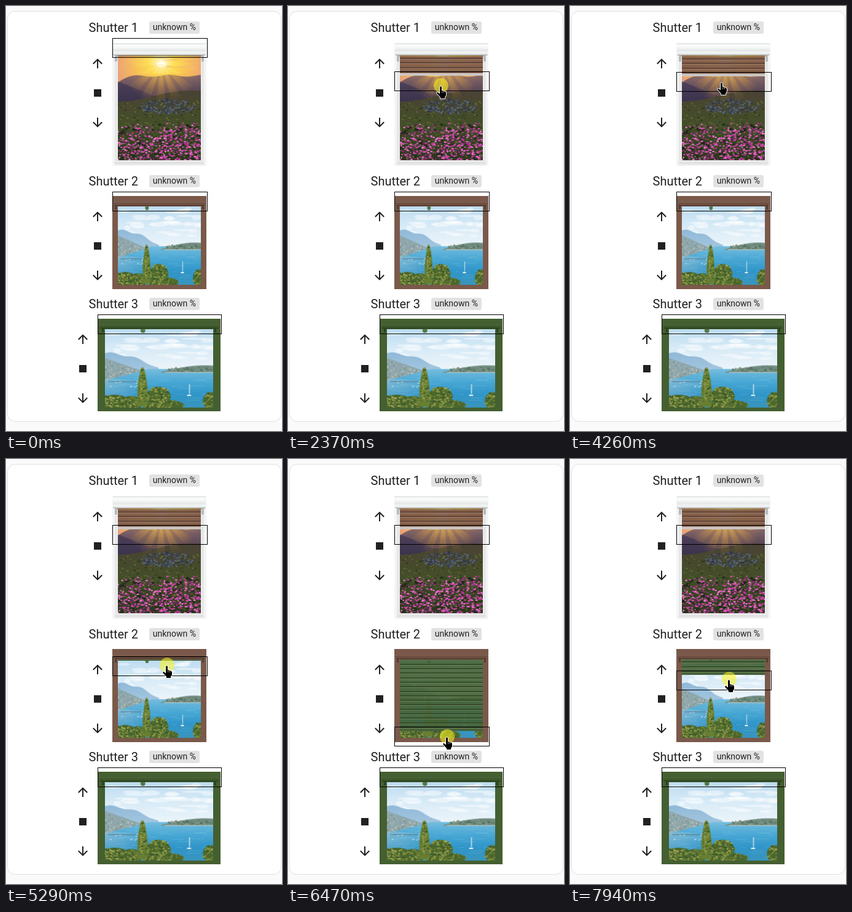
Recreate the animation shown at these times as an HTML page with a canvas. Size 449 px wide and 689 px high, loop 8000 ms.

```html
<!DOCTYPE html>
<html lang="en">
<head>
<meta charset="utf-8">
<title>Shutters</title>
<style>
html, body { margin: 0; width: 100%; height: 100%; overflow: hidden; background: #fafafa; }
canvas { display: block; }
</style>
</head>
<body>
<canvas id="stage" width="449" height="689"></canvas>
<script>
const W = 449, H = 689, LOOP = 8000;
const ctx = document.getElementById('stage').getContext('2d');

// Each move goes to a point in n even steps; bow bends the path sideways.
// While a handle (0 or 1) is dragged, its top edge goes to y = top.
const START = { x: 395, y: 678, tops: [52, 301] };
const MOVES = [
  { from: 530, till: 1540, n: 15, x: 260, y: 68, bow: -12, ease: 3 },
  { from: 1940, till: 2900, n: 15, x: 244, y: 187, bow: -3, ease: 1.15, handle: 0, top: 171, follow: 0.95 },
  { from: 3240, till: 3860, n: 10, x: 247, y: 123, bow: -2, ease: 2.1, handle: 0, top: 107, follow: 1.85 },
  { from: 4330, till: 5070, n: 11, x: 263, y: 315, bow: 20, ease: 1 },
  { from: 5220, till: 7020, n: 27, x: 259, y: 469, bow: -1, ease: 1.74, handle: 1, top: 452, follow: 1.73 },
  { from: 7280, till: 7940, n: 11, x: 259, y: 357, bow: 0, ease: 1.5, handle: 1, top: 343, follow: 1.5 }
];

const easeOut = (u, power) => 1 - Math.pow(1 - u, power);
const mix = (a, b, u) => a + (b - a) * u;

function pose(t) {
  let { x, y } = START;
  const tops = [...START.tops];
  for (const m of MOVES) {
    if (t < m.from) break;
    const step = (m.till - m.from) / (m.n - 1);
    const u = Math.min(1, (Math.floor((t - m.from) / step + 1e-6) + 1) / m.n);
    const v = easeOut(u, m.ease);
    x = mix(x, m.x, v) + m.bow * Math.sin(Math.PI * v);
    y = mix(y, m.y, v);
    if ('handle' in m) tops[m.handle] = mix(tops[m.handle], m.top, easeOut(u, m.follow));
  }
  return { x: Math.round(x), y: Math.round(y), tops: tops.map(Math.round) };
}

function random(seed) {
  return () => (seed = (seed * 16807) % 2147483647) / 2147483647;
}

function layer(w, h, paint) {
  const c = document.createElement('canvas');
  c.width = w;
  c.height = h;
  paint(c.getContext('2d'));
  return c;
}

function box(g, color, x, y, w, h) {
  g.fillStyle = color;
  g.fillRect(x, y, w, h);
}

function oval(g, color, x, y, rx, ry = rx) {
  g.fillStyle = color;
  g.beginPath();
  g.ellipse(x, y, rx, ry, 0, 0, Math.PI * 2);
  g.fill();
}

// Fills from the skyline f(x) down to base.
function hill(g, color, x0, x1, base, f) {
  g.fillStyle = color;
  g.beginPath();
  g.moveTo(x0, base);
  for (let x = x0; x <= x1; x++) g.lineTo(x, f(x));
  g.lineTo(x1, base);
  g.fill();
}

function stops(f, colors) {
  colors.forEach((c, i) => f.addColorStop(i / (colors.length - 1), c));
  return f;
}

const fade = (g, y0, y1, ...colors) => stops(g.createLinearGradient(0, y0, 0, y1), colors);
const glow = (g, x, y, r, ...colors) => stops(g.createRadialGradient(x, y, 0, x, y, r), colors);

function speckle(g, rnd, n, colors, size, place) {
  for (let i = 0; i < n; i++) {
    const [x, y] = place();
    const s = size * (0.5 + rnd());
    oval(g, colors[Math.floor(rnd() * colors.length)], x, y, s, s * 0.75);
  }
}

function inOval(rnd, x, y, rx, ry) {
  const a = rnd() * Math.PI * 2, d = Math.sqrt(rnd());
  return [x + rx * d * Math.cos(a), y + ry * d * Math.sin(a)];
}

const meadow = layer(137, 170, g => {
  const rnd = random(77);
  box(g, glow(g, 72, 12, 88, '#fffbd0', '#fddf55', '#f9c45c', '#efaa70', '#df9483'), 0, 0, 137, 60);
  for (let i = 0; i < 16; i++) {
    oval(g, 'rgba(240,165,115,.3)', rnd() * 137, rnd() * 28, 6 + rnd() * 10, 1.5);
  }
  oval(g, '#fffef0', 72, 15, 8, 5);
  hill(g, fade(g, 30, 80, '#8a6a6c', '#5d4b58', '#403a48'), 0, 137, 90,
    x => 33 + 10 * Math.exp(-x / 12) + 1.5 * Math.cos(x / 9));
  hill(g, 'rgba(48,42,80,.5)', 0, 80, 90, x => 42 + x * 0.4);
  box(g, glow(g, 72, 20, 60, 'rgba(255,215,90,.6)', 'rgba(235,165,70,.25)', 'rgba(220,150,60,0)'), 0, 30, 137, 60);
  hill(g, fade(g, 56, 170, '#4a4236', '#48482e', '#434f29', '#33431f', '#2b351d'), 0, 137, 170,
    x => 66 + 9 * Math.cos(x / 38));
  g.fillStyle = glow(g, 72, 14, 66, 'rgba(255,224,90,.4)', 'rgba(250,190,65,.25)', 'rgba(220,150,60,0)');
  for (let a = 0.3; a < 2.9; a += 0.43) {
    g.beginPath();
    g.moveTo(72, 14);
    g.arc(72, 14, 70, a - 0.13, a + 0.13);
    g.fill();
  }
  speckle(g, rnd, 420, ['#2d3a1e', '#566a2c', '#3e4a25', '#66693a'], 1.3,
    () => [rnd() * 137, 74 + rnd() * 96]);
  speckle(g, rnd, 330, ['#4d5878', '#343d59', '#626c8a', '#2c344b'], 1.1,
    () => inOval(rnd, 82, 83, 46, 12));
  speckle(g, rnd, 160, ['#25301b', '#31421f', '#1f2619'], 2.2,
    () => [rnd() * 137, 112 + rnd() * 58]);
  speckle(g, rnd, 620, ['#b73a97', '#d450b2', '#e678c8', '#8e2c75', '#cc48a8'], 1.4,
    () => [rnd() * 137, 110 + Math.pow(rnd(), 0.75) * 60]);
});

const bay = layer(178, 128, g => {
  g.scale(178 / 137, 1);
  const rnd = random(31);
  box(g, fade(g, 0, 66, '#bddcf1', '#d8ebf7', '#edf5fa'), 0, 0, 137, 66);
  for (let i = 0; i < 34; i++) {
    oval(g, 'rgba(255,255,255,.45)', 10 + rnd() * 127, 4 + rnd() * 48, 5 + rnd() * 12, 1.5 + rnd() * 3);
  }
  hill(g, fade(g, 36, 76, '#8fb8d8', '#a9cbe1'), 0, 68, 76,
    x => 39 + x * x * 0.0055 - 1.5 * Math.sin(x / 5));
  hill(g, '#8ea7ad', 0, 50, 86, x => 47 + x * 0.45);
  speckle(g, rnd, 150, ['#b5bdb5', '#d4d2c8', '#6d8a84', '#94a49f'], 0.9, () => {
    const x = rnd() * 42;
    return [x, 50 + x * 0.45 + rnd() * (32 - x * 0.6)];
  });
  hill(g, fade(g, 63, 128, '#7abfdf', '#4ba9d5', '#3095c9', '#3a95bd'), 0, 137, 128,
    x => Math.max(65, 84 - x * 0.34));
  box(g, glow(g, 0, 84, 55, 'rgba(160,195,212,.6)', 'rgba(160,195,212,0)'), 0, 82, 60, 46);
  for (let i = 0; i < 38; i++) {
    box(g, 'rgba(150,212,236,.3)', rnd() * 130, 68 + rnd() * 48, 5 + rnd() * 14, 0.8);
  }
  hill(g, '#738d82', 71, 137, 71, x => 70 - 11 * Math.sin((x - 71) / 35));
  speckle(g, rnd, 90, ['#5d7a66', '#8a9c90', '#4f6d5a'], 1.1,
    () => inOval(rnd, 108, 66, 30, 4));
  box(g, '#c4cec9', 76, 70, 61, 1);
  box(g, '#5b8095', 4, 85, 38, 1.2);
  for (let i = 0; i < 9; i++) box(g, '#e6eef0', 4 + rnd() * 40, 84 + rnd() * 10, 2.5, 0.9);

  const leaves = ['#6c8038', '#8a9645', '#526d2e', '#a0a555', '#3d5a2b'];
  const bushes = [[12, 121, 20, 14], [33, 121, 14, 12], [68, 110, 15, 16], [74, 124, 26, 9], [134, 117, 10, 14]];
  for (const b of bushes) {
    oval(g, '#4b682d', ...b);
    speckle(g, rnd, b[2] * b[3] * 0.5, leaves, 1.4, () => inOval(rnd, ...b));
  }
  hill(g, '#687f32', 41, 54, 126, x => 62 + Math.pow(Math.abs(x - 47.5) / 6.5, 2) * 34);
  speckle(g, rnd, 110, leaves, 1.1, () => {
    const v = rnd();
    return [47.5 + (rnd() - 0.5) * (4 + v * 9), 64 + v * 60];
  });
  box(g, '#e8f0f4', 106.5, 90, 1, 16);
  box(g, '#f5f7f7', 104, 107, 5, 2);
  oval(g, '#567646', 48, 2, 3, 4);
});

function icons(g, cx, cy) {
  const up = 'M13,20H11V8L5.5,13.5L4.08,12.08L12,4.16L19.92,12.08L18.5,13.5L13,8V20Z';
  const down = 'M11,4H13V16L18.5,10.5L19.92,11.92L12,19.84L4.08,11.92L5.5,10.5L11,16V4Z';
  const stop = 'M18,18H6V6H18V18Z';
  g.fillStyle = '#212121';
  [up, stop, down].forEach((d, i) => {
    g.save();
    g.translate(cx - 12, cy - 12 + i * 48);
    g.fill(new Path2D(d));
    g.restore();
  });
}

function heading(g, n, y) {
  g.fillStyle = '#e2e2e2';
  g.beginPath();
  g.roundRect(233, y - 10, 82, 20, 3);
  g.fill();
  g.fillStyle = '#212121';
  g.font = '20px Roboto, sans-serif';
  g.fillText('Shutter ' + n, 134.5, y + 7);
  g.font = '14px Roboto, sans-serif';
  g.fillText('unknown %', 238.7, y + 4);
}

function whiteWindow(g) {
  box(g, '#f4f4f4', 173, 60, 153, 199);
  for (const x of [177, 318]) {
    box(g, '#e6e8e8', x, 80, 4, 172);
    box(g, '#b3bcbc', x, 80, 4, 10);
  }
  box(g, '#e9e9e9', 177, 250, 145, 8);
  box(g, '#d3d5d5', 177, 254, 145, 1);
  g.drawImage(meadow, 182, 80, 135, 170);
  box(g, fade(g, 60, 80, '#dfe2e2', '#fcfcfc', '#f4f5f5', '#e4e7e7', '#f5f6f6', '#cdd1d1'), 174, 60, 151, 20);
  box(g, '#a5abab', 175, 79, 149, 1);
  box(g, 'rgba(70,60,50,.45)', 181, 80, 137, 2);
}

function paintedWindow(g, x, y, w, h, border, base, dark, light) {
  box(g, base, x, y, w, h);
  g.drawImage(bay, x + border, y + 17, w - 2 * border, 127);
  box(g, light, x, y + 10, w, 1);
  box(g, dark, x + 2, y + 11, w - 4, 1);
  box(g, dark, x + 3, y + 14, w - 6, 2);
  for (const bx of [x + border - 5, x + w - border + 2]) box(g, dark, bx, y + 16, 3, 6);
}

const scene = layer(W, H, g => {
  box(g, '#fafafa', 0, 0, W, H);
  g.fillStyle = '#fff';
  g.strokeStyle = '#e0e0e0';
  g.beginPath();
  g.roundRect(2.5, 8.5, 445, 665, 12);
  g.fill();
  g.stroke();
  whiteWindow(g);
  paintedWindow(g, 173, 308, 153, 151, 9, '#7a594a', '#563d33', '#8b6859');
  paintedWindow(g, 149, 507, 200, 150, 12, '#445f31', '#2b421f', '#55703e');
  icons(g, 149, 93);
  icons(g, 149, 341);
  icons(g, 125, 540);
});

function slats(top, limit, bottom, body, dark, light, rail) {
  if (bottom <= top) return;
  ctx.save();
  ctx.beginPath();
  ctx.rect(182, top, 135, Math.min(bottom, limit) - top);
  ctx.clip();
  ctx.globalAlpha = 0.9;
  box(ctx, body, 182, top, 135, bottom - top);
  for (let y = bottom - 5; y > top - 8; y -= 7.3) {
    const line = Math.round(y);
    box(ctx, dark, 182, line - 2, 135, 2);
    box(ctx, light, 182, line, 135, 1);
  }
  ctx.globalAlpha = 1;
  box(ctx, rail, 182, bottom - 4, 135, 4);
  ctx.restore();
}

function handle(x, y, w) {
  ctx.strokeStyle = '#000';
  ctx.lineWidth = 1;
  ctx.strokeRect(x + 0.5, y + 0.5, w, 31);
}

const HAND = new Path2D('M6 2.5Q7.5 0 9 2.5V8L11 8.4L13 9L15 10Q16.3 11 16 13V16L14 19V21H7V19L1.5 13Q.5 11 2.5 10.8L6 13.5Z');
const ARROW = new Path2D('M.5.5V16L4 12.7L6.5 18.3L9 17.2L6.5 11.8H11.5Z');

function cursor(x, y, shape) {
  ctx.save();
  ctx.translate(shape === HAND ? x - 8 : x, y);
  ctx.lineJoin = 'round';
  ctx.lineWidth = 1.8;
  ctx.strokeStyle = '#fff';
  ctx.stroke(shape);
  ctx.fillStyle = '#000';
  ctx.fill(shape);
  if (shape === HAND) {
    for (const k of [9.5, 12]) box(ctx, '#ddd', k, 9, 0.7, 3);
  }
  ctx.restore();
}

function draw(t) {
  const { x, y, tops: [y1, y2] } = pose(t);
  ctx.drawImage(scene, 0, 0);
  slats(82, 250, y1 + 7, '#7b5748', '#5c4036', '#a58470', '#cbc6c4');
  slats(325, 452, y2 + 7, '#426034', '#304a28', '#6e8258', '#48613b');
  heading(ctx, 1, 35);
  heading(ctx, 2, 284);
  heading(ctx, 3, 483);
  handle(173, y1, 154);
  handle(173, y2, 154);
  handle(149, 500, 201);
  if (t < MOVES[0].from) return;

  const pressed = (t >= 1740 && t < 4260) || t >= 5220;
  const over = x > 173 && x < 328 && [y1, y2, 500].some(h => y >= h && y <= h + 31);
  if (pressed) oval(ctx, 'rgba(252,244,30,.56)', x, y, 12);
  cursor(x, y, pressed || over ? HAND : ARROW);
}

const start = performance.now();
function tick() {
  draw((performance.now() - start) % LOOP);
  requestAnimationFrame(tick);
}
draw(0);
requestAnimationFrame(tick);
</script>
</body>
</html>
```
